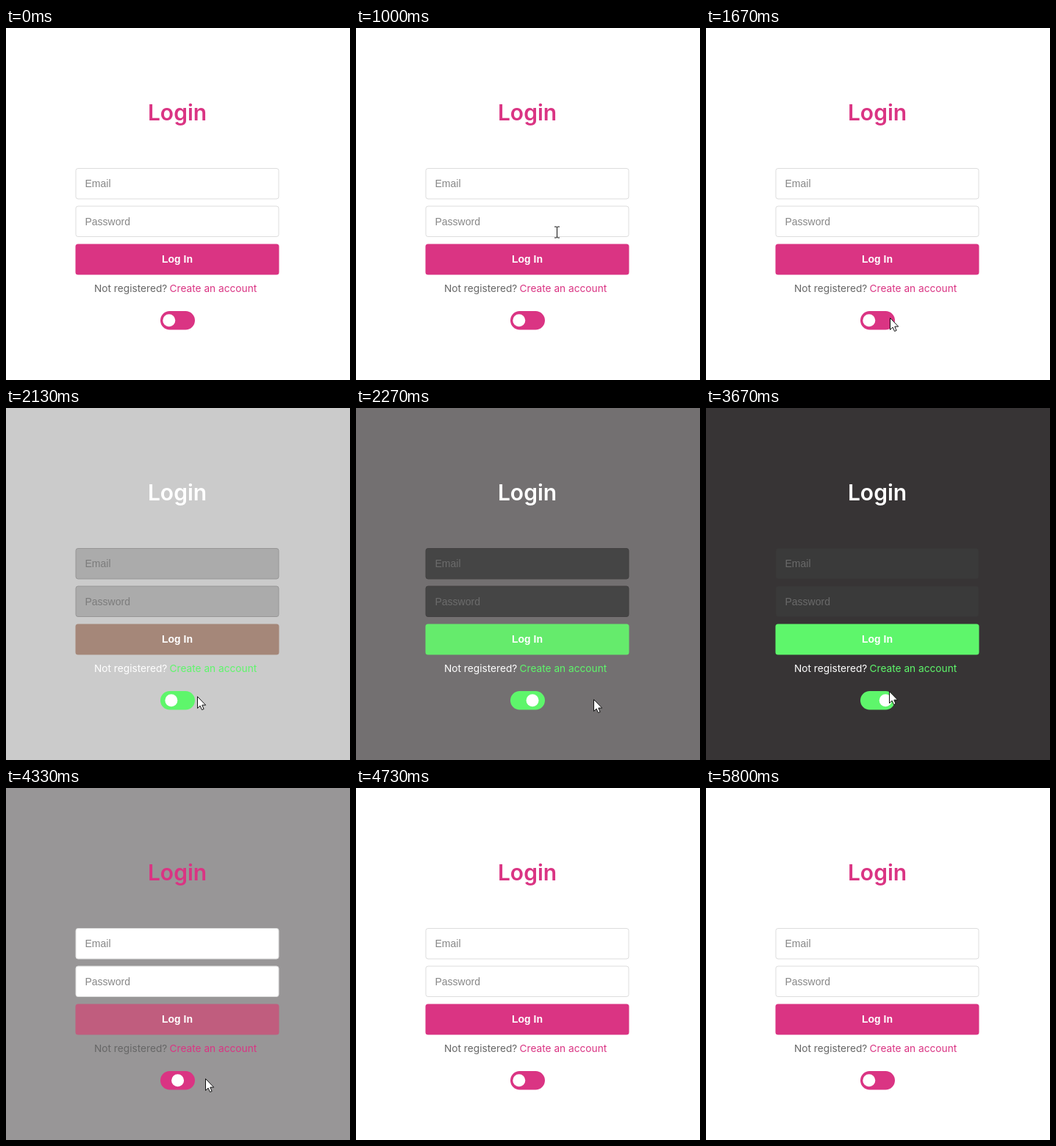
Animation, 468 px wide and 480 px high, one loop 6270 ms. Source, as an HTML page with a canvas:

```html
<!DOCTYPE html>
<html lang="en">
<head>
<meta charset="utf-8">
<title>Login</title>
<style>
html, body { margin: 0; width: 100%; height: 100%; overflow: hidden; }
canvas { display: block; }
</style>
</head>
<body>
<canvas id="stage" width="468" height="480"></canvas>
<script>
const ctx = document.getElementById('stage').getContext('2d');
const LOOP = 6270, STEP = 200 / 3, FADE = 300;
const TO_DARK = 2056, TO_LIGHT = 4188;

const light = {
  page: [255, 255, 255], field: [255, 255, 255], border: [221, 221, 221],
  accent: [218, 52, 131], hint: [135, 135, 135], title: '#da3483', note: '#666'
};
const dark = {
  page: [55, 52, 53], field: [58, 58, 58], border: [56, 54, 55],
  accent: [94, 246, 107], hint: [106, 106, 106], title: '#fff', note: '#fff'
};

// Pointer path: time, x, y. It is hidden outside each run.
const runs = [
  [[866, 405, 300], [933, 335, 286], [1000, 273, 278], [1200, 268, 280], [1400, 259, 312],
   [1667, 250, 395], [2060, 250, 395], [2133, 260, 393], [2270, 325, 397], [2400, 365, 399],
   [3330, 364, 399], [3600, 252, 388], [3667, 249, 386], [4000, 247, 391], [4190, 249, 392],
   [4333, 271, 396], [4467, 310, 425], [4600, 350, 482]]
];

const clamp = v => Math.min(1, Math.max(0, v));
const mix = (a, b, p) => a + (b - a) * p;
const blend = (key, p) => `rgb(${light[key].map((c, i) => Math.round(mix(c, dark[key][i], p)))})`;

function bezier(x1, y1, x2, y2) {
  const at = (a, b, s) => 3 * a * s * (1 - s) ** 2 + 3 * b * s * s * (1 - s) + s ** 3;
  return x => {
    let lo = 0, hi = 1;
    for (let i = 0; i < 20; i++) {
      const mid = (lo + hi) / 2;
      if (at(x1, x2, mid) < x) lo = mid; else hi = mid;
    }
    return at(y1, y2, (lo + hi) / 2);
  };
}
const ease = bezier(.25, .1, .25, 1);
const easeInOut = bezier(.42, 0, .58, 1);

function box(x, y, w, h, r, fill, stroke) {
  ctx.beginPath();
  ctx.roundRect(x, y, w, h, r);
  ctx.fillStyle = fill;
  ctx.fill();
  if (stroke) {
    ctx.strokeStyle = stroke;
    ctx.lineWidth = 1;
    ctx.stroke();
  }
}

function text(str, x, y, font, color, align = 'left') {
  ctx.font = font;
  ctx.fillStyle = color;
  ctx.textAlign = align;
  ctx.fillText(str, x, y);
}

const arrow = new Path2D('M0 0V16L3.6 12.6 6 18 8.6 17 6.3 11.6H11.2Z');
const beam = new Path2D('M-3.5 -7.5H-1Q0 -7.5 0 -6.5V6.5Q0 7.5 -1 7.5H-3.5M3.5 -7.5H1Q0 -7.5 0 -6.5M0 6.5Q0 7.5 1 7.5H3.5');

function pointer(t) {
  const path = runs.find(r => t >= r[0][0] && t < r[r.length - 1][0]);
  if (!path) return;
  const i = path.findIndex(p => p[0] > t), [t0, x0, y0] = path[i - 1], [t1, x1, y1] = path[i];
  const p = (t - t0) / (t1 - t0), x = mix(x0, x1, p), y = mix(y0, y1, p);
  const overField = x > 95 && x < 371 && (y > 191 && y < 233 || y > 243 && y < 285);
  ctx.save();
  ctx.translate(Math.round(x) + .5, Math.round(y) + .5);
  ctx.lineWidth = 1;
  ctx.strokeStyle = '#111';
  if (overField) {
    ctx.stroke(beam);
  } else {
    ctx.fillStyle = '#fff';
    ctx.fill(arrow);
    ctx.stroke(arrow);
  }
  ctx.restore();
}

function draw(t) {
  const isDark = t >= TO_DARK && t < TO_LIGHT;
  const theme = isDark ? dark : light;
  const p = t < TO_DARK ? 1 : clamp((t - (isDark ? TO_DARK : TO_LIGHT)) / FADE);
  const toward = v => isDark ? v : 1 - v;
  const eased = toward(ease(p));
  const fieldMix = isDark ? eased : toward(ease(clamp(p * 2)));
  const accent = `rgb(${theme.accent})`;

  ctx.fillStyle = blend('page', toward(p));
  ctx.fillRect(0, 0, 468, 480);
  text('Login', 233, 126, '600 30px Inter, sans-serif', theme.title, 'center');

  ['Email', 'Password'].forEach((label, i) => {
    const y = 191.5 + i * 51.5;
    box(95, y, 276, 41.5, 3, blend('field', fieldMix), blend('border', fieldMix));
    text(label, 107.5, y + 25.5, '14px "Liberation Sans", sans-serif', blend('hint', fieldMix));
  });

  box(94.5, 294.5, 277, 42, 3.5, blend('accent', eased));
  text('Log In', 233, 320, 'bold 14px "Liberation Sans", sans-serif', '#fff', 'center');

  const small = '13.7px Inter, sans-serif';
  text('Not registered?', 120, 360, small, theme.note);
  text('Create an account', 222.5, 360, small, accent);

  box(210, 386, 47, 25.5, 12.75, accent);
  const knob = mix(221.8, 244.2, toward(easeInOut(p)));
  box(knob - 8.5, 390.2, 17, 17, 8.5, '#fff');
  pointer(t);
}

const start = performance.now();
function tick() {
  const t = (performance.now() - start) % LOOP;
  draw(Math.floor((t + 4) / STEP) * STEP);
  requestAnimationFrame(tick);
}
tick();
</script>
</body>
</html>
```
